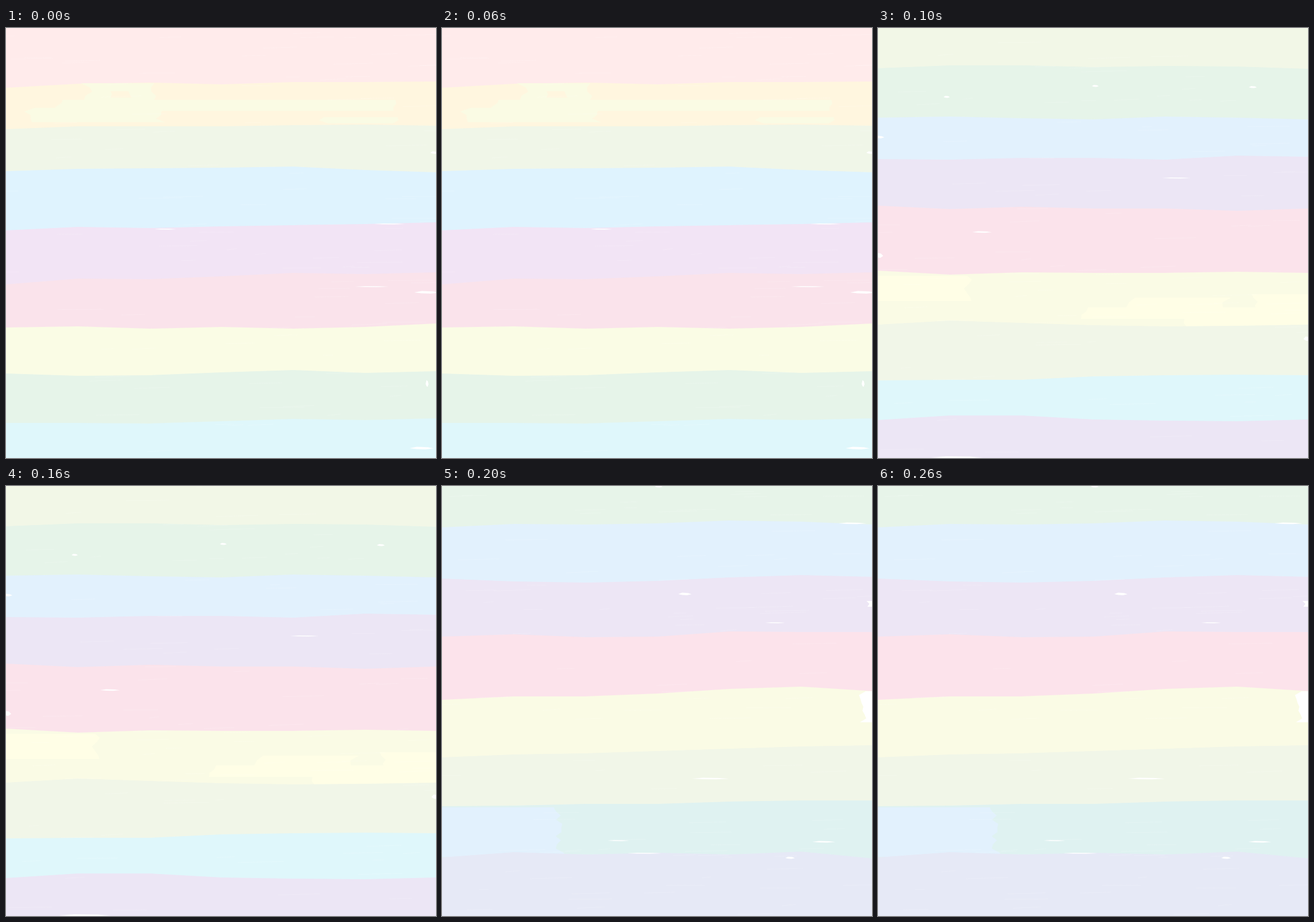
Recreate the animation shown at these times as an HTML page. Size 748x748 px, loop 300 ms.

```html
<!DOCTYPE html>
<html lang="en">
<head>
<meta charset="utf-8">
<title>Pastel stripes</title>
<style>
html, body { margin: 0; width: 100%; height: 100%; overflow: hidden; background: #fff; }
svg { display: block; width: 100vw; height: 100vh; }
</style>
</head>
<body>
<svg id="stage" viewBox="0 0 748 748"></svg>
<script>
const STEP = 100;
const SIZE = 748;

let seed = 71;
const random = () => (seed = (seed * 16807) % 2147483647) / 2147483647;

const path = (d, fill, extra = '') => `<path d="${d}" fill="${fill}" ${extra}/>`;

// The heights of the top edge are evenly spaced; the band reaches down to the bottom.
function band(fill, ...heights) {
  const gap = 750 / (heights.length - 1 || 1);
  const edge = heights.map((y, i) => `${i * gap},${y}`).join(' ');
  return path(`M${edge} 750,750 0,750Z`, fill);
}

// A brush stroke with ragged ends.
function daub(fill, x, y, w, h) {
  const rows = Math.max(2, Math.round(h / 7));
  const rag = Math.min(24, w * .25);
  const left = [], right = [];
  for (let i = 0; i <= rows; i++) {
    const rowY = y + h * i / rows;
    left.unshift(`${x + random() * rag},${rowY}`);
    right.push(`${x + w - random() * rag},${rowY}`);
  }
  return path(`M${[...right, ...left].join(' ')}Z`, fill);
}

// A small tapered sliver of bare paper.
const fleck = (x, y, w, h) =>
  path(`M${x} ${y}l${w * .3} ${-h / 2} ${w * .45} ${h * .15} ${w * .25} ${h * .4} ${-w * .35} ${h * .35} ${-w * .35} ${-h * .1}Z`, '#fff');

// Faint dry-brush hairs.
function hairs() {
  let d = '';
  for (let i = 0; i < 100; i++) {
    d += `M${random() * 760 - 30} ${random() * SIZE}l${15 + random() * 65} ${-random() * 2.5}`;
  }
  return path(d, 'none', 'stroke="#fff" stroke-width=".8" stroke-opacity=".2"');
}

const pinkFirst = () => [
  band('#ffebeb', 0, 0),
  band('#fff6df', 104, 97, 95, 98, 94, 94, 93),
  daub('#fafbe4', 130, 96, 136, 44),
  daub('#fafbe4', 80, 125, 612, 19),
  daub('#fafbe4', 30, 139, 250, 25),
  daub('#fafbe4', 538, 155, 152, 11),
  daub('#fff6df', 178, 110, 46, 11),
  band('#f0f6e8', 176, 171, 171, 171, 169, 168, 170),
  band('#dff3fe', 249, 245, 244, 243, 241, 247, 251),
  band('#f2e4f5', 352, 346, 348, 345, 343, 341, 338),
  band('#fae3eb', 446, 436, 437, 432, 426, 428, 425),
  band('#fafce5', 521, 519, 523, 520, 523, 520, 514),
  band('#e6f4e9', 601, 605, 604, 599, 595, 600, 597),
  band('#dff7fb', 687, 687, 688, 684, 680, 682, 679),
  hairs(),
  fleck(640, 341, 54, 2),
  fleck(258, 350, 38, 2),
  fleck(607, 450, 58, 2),
  fleck(710, 460, 44, 5),
  fleck(730, 619, 5, 13),
  fleck(702, 731, 42, 5),
  fleck(738, 217, 14, 5)
];

const greenFirst = () => [
  band('#f2f7e7', 0, 0),
  band('#e6f4e9', 70, 65, 65, 68, 66, 67, 71),
  band('#e2f1fd', 156, 154, 157, 159, 154, 156, 159),
  band('#ece6f5', 228, 229, 226, 226, 229, 222, 224),
  band('#fbe3eb', 309, 315, 311, 314, 314, 318, 314),
  band('#fafbe5', 422, 429, 425, 426, 426, 424, 426),
  daub('#fffee6', -20, 431, 192, 44),
  daub('#fffee6', 345, 486, 420, 20),
  daub('#fffee6', 430, 469, 190, 17),
  daub('#fffee6', 640, 463, 140, 40),
  daub('#fffee6', 520, 500, 250, 20),
  band('#f1f6e8', 516, 509, 513, 517, 519, 518, 516),
  band('#dff7fb', 613, 612, 612, 606, 604, 603, 604),
  band('#ece6f5', 682, 674, 674, 681, 683, 684, 681),
  hairs(),
  fleck(372, 101, 12, 4),
  fleck(114, 120, 11, 4),
  fleck(645, 103, 14, 4),
  fleck(494, 261, 50, 2),
  fleck(164, 355, 34, 3),
  fleck(-6, 396, 15, 10),
  fleck(-6, 190, 17, 5),
  fleck(740, 541, 14, 9),
  fleck(92, 747, 90, 4)
];

const mintFirst = () => [
  band('#e7f4e9', 0, 0),
  band('#e2f1fd', 72, 66, 67, 65, 60, 62, 67),
  band('#ede6f5', 161, 166, 168, 165, 159, 155, 158),
  band('#fce3eb', 262, 258, 263, 262, 253, 254, 254),
  band('#fafbe5', 372, 366, 366, 361, 353, 349, 357),
  band('#f1f6e8', 472, 467, 465, 461, 457, 453, 451),
  band('#dff2f1', 557, 556, 553, 553, 549, 547, 547),
  daub('#e2f1fd', -30, 559, 246, 86),
  band('#e6e9f6', 646, 637, 641, 638, 641, 636, 648),
  hairs(),
  daub('#fff', 724, 357, 60, 54),
  daub('#fff', 736, 200, 30, 10),
  fleck(690, 65, 48, 3),
  fleck(411, 188, 23, 5),
  fleck(562, 238, 35, 2),
  fleck(435, 509, 64, 3),
  fleck(288, 617, 38, 2),
  fleck(644, 619, 40, 3),
  fleck(322, 639, 60, 2),
  fleck(597, 647, 17, 4),
  fleck(370, 1, 14, 4)
];

const stage = document.getElementById('stage');
stage.innerHTML = [pinkFirst, greenFirst, mintFirst]
  .map(scene => `<g>${scene().join('')}</g>`).join('');
const groups = [...stage.children];

const start = performance.now();

function update(now) {
  const current = Math.floor(Math.max(0, now - start) / STEP) % groups.length;
  groups.forEach((group, i) => group.setAttribute('visibility', i === current ? 'visible' : 'hidden'));
  requestAnimationFrame(update);
}

update(start);
</script>
</body>
</html>
```
